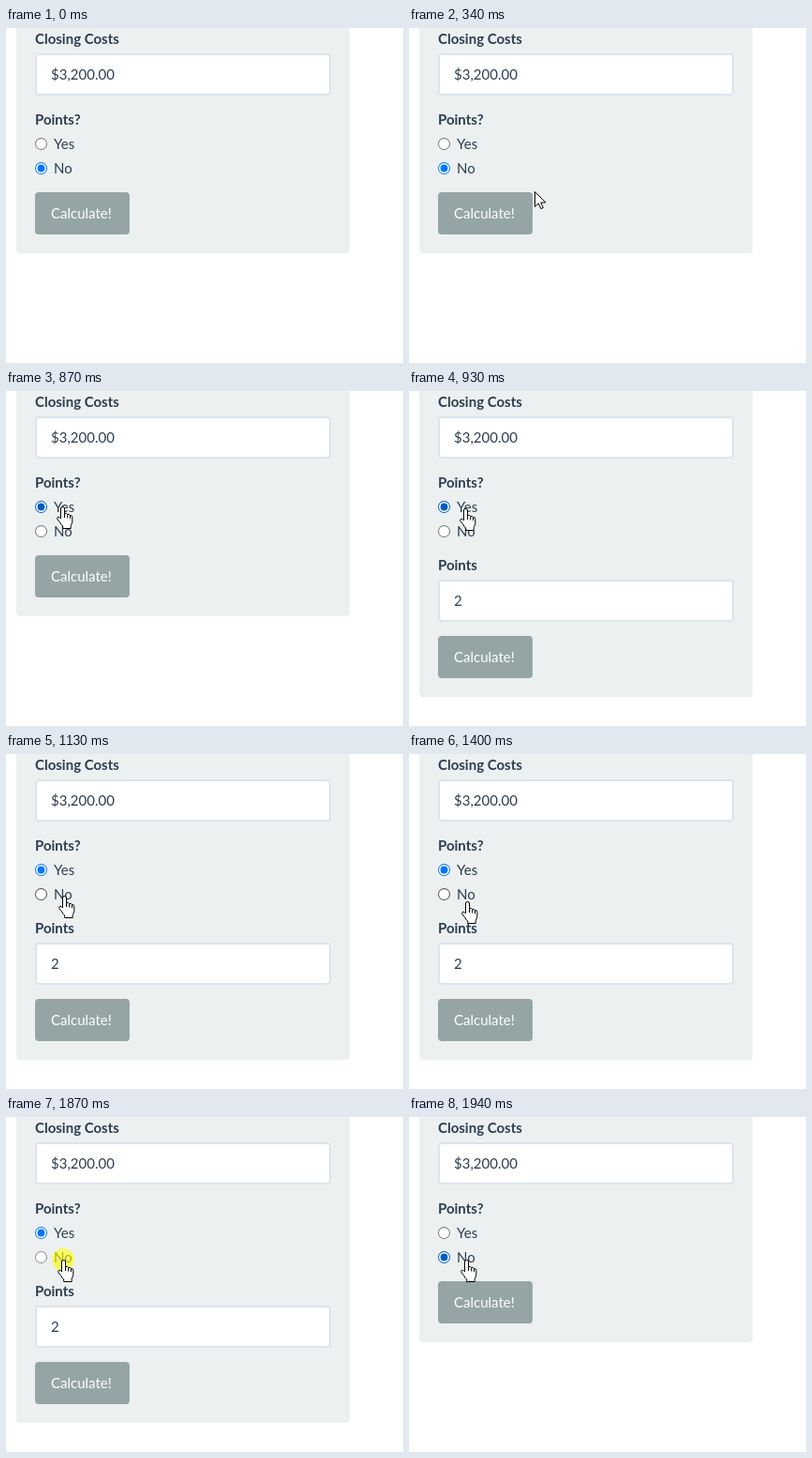
Animation of 424 by 357 pixels, one loop 2140 ms. Source, as an HTML page with a canvas:

```html
<!DOCTYPE html>
<html lang="en">
<head>
<meta charset="utf-8">
<title>Closing costs form</title>
<style>
  html, body { margin: 0; width: 100%; height: 100%; overflow: hidden; background: #fff; }
  canvas { display: block; }
</style>
</head>
<body>
<canvas id="stage" width="424" height="357"></canvas>
<script>
const ctx = document.getElementById('stage').getContext('2d');
const LOOP = 2140;
const TICK = 1000 / 15;
const INK = '#2c3e50';

// Pointer stops after the approach: time, x, y
const STOPS = [
  [600, 74, 127], [670, 67, 125], [730, 61, 123], [800, 60, 123],
  [930, 60, 125], [1000, 61, 131], [1070, 61, 140], [1130, 62, 151],
  [1200, 62, 165], [1400, 62, 157], [1470, 61, 154], [1670, 61, 152]
];

const within = (t, from, to) => t >= from && t < to;

function pointerAt(t) {
  if (t < 70) return null;
  if (t < 600) {
    // Sampled at 15 steps per second, slowing down towards the option
    const step = Math.min(7, Math.floor((t + 4) / TICK) - 1);
    const rest = (1 - step / 7) ** 2;
    return { x: Math.round(82 + 284 * rest), y: Math.round(137 + 199 * rest) };
  }
  const [, x, y] = STOPS.filter(s => s[0] <= t).pop();
  return { x, y };
}

function box(x, y, w, h, r, fill) {
  ctx.beginPath();
  ctx.roundRect(x, y, w, h, r);
  ctx.fillStyle = fill;
  ctx.fill();
}

function disc(x, y, r, fill) {
  ctx.beginPath();
  ctx.arc(x, y, r, 0, Math.PI * 2);
  ctx.fillStyle = fill;
  ctx.fill();
}

function write(text, x, y, color = INK, weight = 400) {
  ctx.font = `${weight} 15px Lato, sans-serif`;
  ctx.fillStyle = color;
  ctx.fillText(text, x, y);
}

function field(label, value, y) {
  write(label, 31, y - 10, INK, 700);
  box(31, y, 316, 45, 4, '#dce4ec');
  box(33, y + 2, 312, 41, 2, '#fff');
  write(value, 48, y + 28);
}

function radio(label, y, checked, state) {
  const tones = checked
    ? { idle: '#0075ff', hover: '#005cc8', press: '#3793ff' }
    : { idle: '#767676', hover: '#4f4f4f', press: '#8d8d8d' };
  const tone = tones[state];
  disc(37.5, y, 6.5, tone);
  disc(37.5, y, 5.5, '#fff');
  if (checked) disc(37.5, y, 3.9, tone);
  write(label, 51, y + 5.5 | 0);
}

const ARROW = new Path2D(
  'M.5 .5V16.5L4.3 12.9L6.9 18.6L9.3 17.5L6.8 12H11.9Z');

const HAND = new Path2D(
  'M-1.5 13V2Q-1.5 .5 .5 .5T2.5 2V7.5Q5 6.8 5.7 8.6Q7.8 7.8 8.5 9.6' +
  'Q10.8 9.2 10.8 11.5V16.5Q10.5 18 9.2 20.5V23.5H.7V21' +
  'Q-1.2 19.5-2.5 16.8L-5 13.8Q-6 11.8-4.4 11.2Q-3 10.9-1.5 13Z');

const KNUCKLES = new Path2D('M2.5 7.5V12M5.7 8.6V12.5M8.5 9.6V13');

function drawPointer({ x, y }, hand) {
  ctx.save();
  ctx.translate(x, y);
  ctx.lineWidth = 1;
  ctx.lineJoin = 'round';
  ctx.fillStyle = '#fff';
  ctx.strokeStyle = '#000';
  const shape = hand ? HAND : ARROW;
  ctx.fill(shape);
  ctx.stroke(shape);
  if (hand) ctx.stroke(KNUCKLES);
  ctx.restore();
}

function draw(t) {
  const yes = within(t, 870, 1940);
  const open = within(t, 930, 1940);
  const pressYes = within(t, 800, 870);
  const pressNo = within(t, 1870, 1940);
  const overYes = within(t, 670, 1070);
  const overNo = within(t, 1130, 1200) || t >= 1400;
  const shift = open ? 86 : 0;
  const state = (press, over) => press ? 'press' : over ? 'hover' : 'idle';

  ctx.fillStyle = '#fff';
  ctx.fillRect(0, 0, 424, 357);
  box(11, -20, 356, 260 + shift, 4, '#ecf0f1');

  field('Closing Costs', '$3,200.00', 27);
  write('Points?', 31, 103, INK, 700);
  radio('Yes', 123.5, yes, state(pressYes, overYes));
  radio('No', 149.5, !yes, state(pressNo, overNo));
  if (open) field('Points', '2', 201);

  box(31, 175 + shift, 101, 45, 4, '#95a5a6');
  write('Calculate!', 48, 203 + shift, '#fff');

  const pointer = pointerAt(t);
  if (!pointer) return;
  if (pressYes || pressNo) disc(pointer.x, pointer.y, 12, 'rgba(255, 255, 0, .6)');
  drawPointer(pointer, overYes || overNo);
}

const start = performance.now();
function tick() {
  draw((performance.now() - start) % LOOP);
  requestAnimationFrame(tick);
}
tick();
</script>
</body>
</html>
```
